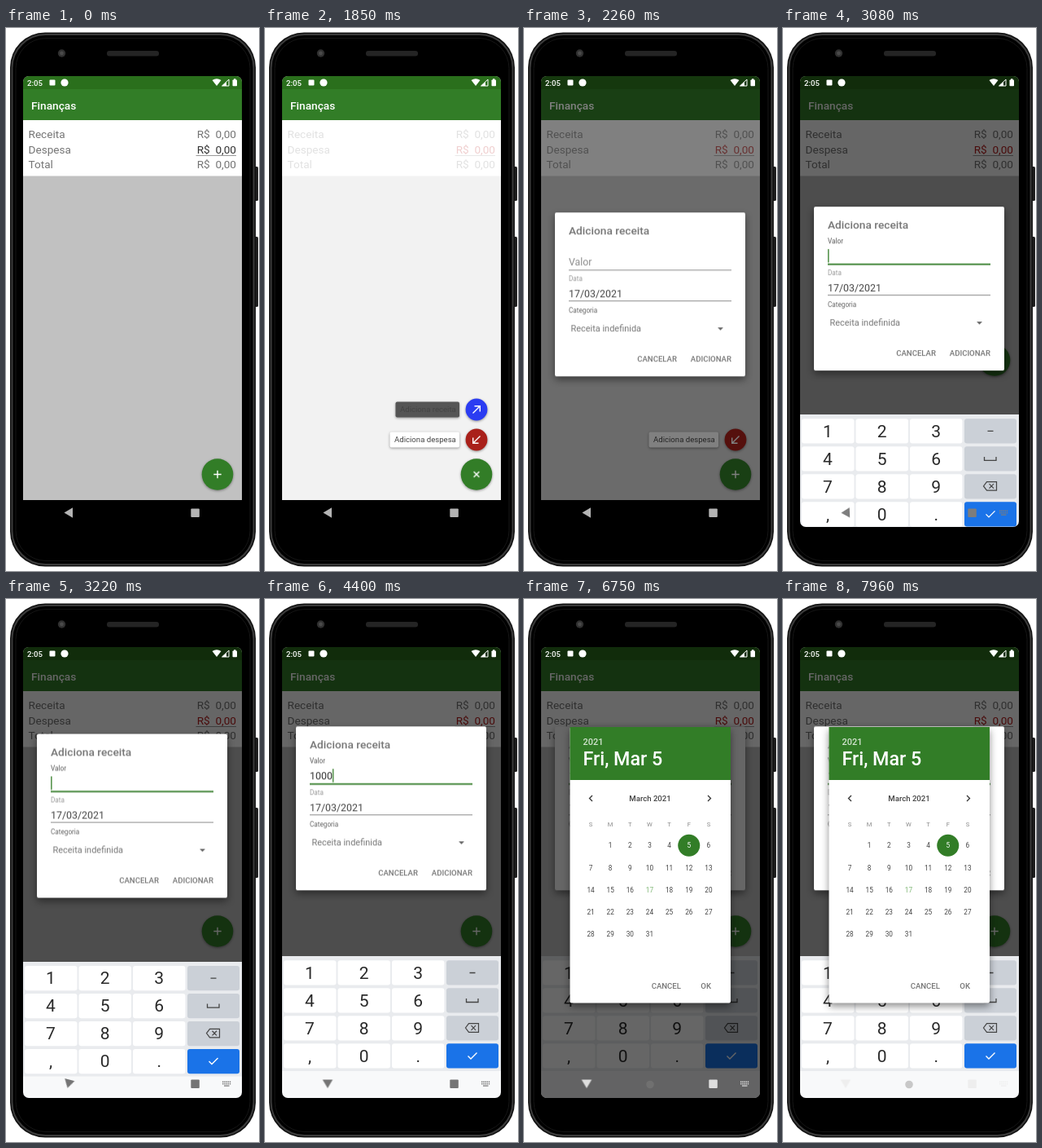
Animation of 311x666 px, one loop 7.99 s. Source, as an HTML page:

```html
<!DOCTYPE html>
<html lang="pt">
<head>
<meta charset="utf-8">
<title>Finanças</title>
<style>
html, body { margin: 0; width: 311px; height: 666px; overflow: hidden; background: #fff; }
svg { display: block; font-family: Roboto, "Noto Sans", sans-serif; }
text { white-space: pre; }
.m { font-weight: 500; }
.drop { filter: drop-shadow(0 1.5px 1.5px rgba(0,0,0,.4)); }
.float { filter: drop-shadow(0 4px 5px rgba(0,0,0,.45)); }
#plus { transform-origin: 260px 547.5px; }
#addIn { transform-origin: 260px 468px; }
#addOut { transform-origin: 260px 505px; }
#form { transform-origin: 155px 100px; }
#picker { transform-origin: 155px 326px; }
#back { transform-origin: 77px 594.5px; }
#hint { transform-origin: 55px 60px; }
</style>
</head>
<body>
<svg id="stage" width="311" height="666" viewBox="0 0 311 666"></svg>
<script>
const LOOP = 7990, GREEN = '#327d27', GREY = '#757575';
const SMOOTH = 'cubic-bezier(.4,0,.2,1)', HOLD = 'step-end';

// Text is placed by the middle of its capitals.
const txt = (x, mid, size, s, attrs = '') =>
  `<text x="${x}" y="${(mid + size * .355).toFixed(2)}" font-size="${size}" ${attrs}>${s}</text>`;
const box = (x, y, w, h, fill, attrs = '') =>
  `<rect x="${x}" y="${y}" width="${w}" height="${h}" fill="${fill}" ${attrs}/>`;
const disc = (x, y, r, fill, attrs = '') =>
  `<circle cx="${x}" cy="${y}" r="${r}" fill="${fill}" ${attrs}/>`;
const line = (d, color, w, attrs = '') =>
  `<path d="${d}" fill="none" stroke="${color}" stroke-width="${w}" ${attrs}/>`;
const MID = 'text-anchor="middle"', END = 'text-anchor="end"', BOLD = 'class="m"';

const phone = () =>
  box(305, 170, 5, 42, '#1d1d1d', 'rx="1.5"') + box(305, 256, 5, 86, '#1d1d1d', 'rx="1.5"') +
  box(5, 5.5, 302, 655, '#111', 'rx="43"') +
  box(7.5, 8, 297, 650, '#000', 'rx="41" stroke="#3b3b3b" stroke-width="2"') +
  box(12, 12.5, 288, 641, '#000', 'rx="37" stroke="#161616"') +
  box(124, 28, 64, 6.5, '#242424', 'rx="3"') +
  disc(68.5, 31, 4.7, '#303030') + disc(68.5, 31, 2.4, '#4a4a4a');

const row = (mid, name, id = '') =>
  txt(27.5, mid, 13.6, name, `fill="${GREY}"`) +
  txt(283, mid, 13.6, 'R$  0,00', `${END} id="${id}" fill="${GREY}"`);

const app = () =>
  box(21, 59, 269, 520, '#c1c1c1') +
  box(21, 59, 269, 16.5, '#2a6f1c') + box(21, 75, 269, 38, GREEN) +
  txt(31, 95, 13.7, 'Finanças', `${BOLD} fill="#fff"`) +
  box(21, 113, 269, 68.5, '#fff') +
  row(130.5, 'Receita', 'a') + row(149, 'Despesa', 'spent') + row(167.5, 'Total', 'b') +
  line('M233.5 156.5H283', '#9a9a9a', 1);

const status = () =>
  txt(26, 67.3, 9.6, '2:05', `${BOLD} fill="#fff"`) +
  box(53.5, 63.5, 7, 7, '#fff', 'rx="1"') + disc(72, 67, 4.6, '#fff') +
  '<path d="M253.5 64Q259 60.5 264.5 64L259 71Z" fill="#fff"/>' +
  '<path d="M274 63V71H265.5Z" fill="none" stroke="#fff"/><path d="M271 66V71H265.5Z" fill="#fff"/>' +
  box(278.5, 63.5, 5.5, 7.7, '#fff', 'rx=".8"') + box(280, 62.3, 2.5, 2, '#fff');

const action = (id, y, x, name, color, arrow) => `<g id="${id}">
  ${box(x, y - 9.5, 239 - x, 19, '#fff', `rx="2" class="drop" id="${id}Tag"`)}
  ${txt(x + 5.5, y, 9.6, name, 'fill="#444"')}
  ${disc(260, y, 13.4, color, 'class="drop"')}${line(arrow, '#fff', 1.4)}</g>`;

const menu = () =>
  action('addIn', 468, 160.5, 'Adiciona receita', '#2b3cf2', 'M255.5 472.5L264 464M257.5 463.7H264.3V470.5') +
  action('addOut', 505, 153.5, 'Adiciona despesa', '#a9201a', 'M264.5 500.5L256 509M255.7 502.5V509.3H262.5') +
  `<g id="fab">${disc(260, 547.5, 19.3, GREEN, 'class="drop"')}
   <g id="plus">${line('M255.3 547.5H264.7M260 542.8V552.2', '#fff', 1.4)}</g></g>`;

const form = () => `<g id="formMove"><g id="form">
  ${box(38, 0, 234, 201, '#fff', 'rx="2" class="float"')}
  ${txt(55, 22.3, 13.7, 'Adiciona receita', `${BOLD} fill="#757575"`)}
  <g id="hint">${txt(55, 60.3, 12.3, 'Valor', 'id="hintText" fill="#8c8c8c"')}</g>
  <text x="55" y="65" font-size="12.4" fill="#333">${[...'1000'].map((c, i) =>
    `<tspan id="key${i}">${c}</tspan>`).join('')}</text>
  ${box(55.2, 52, 1.3, 16.5, GREEN, 'id="caret"')}
  ${line('M55 70.7H255', '#8c8c8c', 1)}
  ${line('M55 70.6H255', GREEN, 1.6, 'id="focus"')}
  ${txt(55, 81, 8.2, 'Data', 'fill="#9a9a9a"')}
  ${txt(55, 99.3, 12.4, '17/03/2021', 'fill="#444"')}
  ${line('M55 108.5H255', '#8c8c8c', 1)}
  ${line('M55 108.4H255', GREEN, 1.6, 'id="press"')}
  ${txt(55, 120.3, 8.2, 'Categoria', 'fill="#666"')}
  ${txt(57.5, 142.3, 10.95, 'Receita indefinida', 'fill="#777"')}
  <path d="M238 141H245L241.5 144.5Z" fill="#666"/>
  ${txt(188, 180, 9.6, 'CANCELAR', `${BOLD} ${END} fill="#757575"`)}
  ${txt(255, 180, 9.6, 'ADICIONAR', `${BOLD} ${END} fill="#757575"`)}
</g></g>`;

const keyboard = () => {
  let out = box(21, 438, 269, 176, '#e9ebee') + box(21, 579, 269, 35, '#f8f9fa');
  ['123', '456', '789', ',0.'].forEach((keys, r) => {
    const mid = 458.3 + 34 * r;
    [...keys].forEach((k, c) => {
      out += box(23 + 66.5 * c, mid - 15, 64.5, 30.3, '#fff', 'rx="3"') +
        txt(55 + 66.6 * c, mid, 21, k, `${MID} fill="#2a2a2a"`);
    });
    out += box(223, mid - 15, 64, 30.3, r < 3 ? '#cbd0d7' : '#1a73e8', 'rx="3"');
  });
  return `<g id="keyboard">${out}
    ${line('M251.5 458.5H258.5M247.5 490V494.5H262V490', '#444', 1.3)}
    ${line('M250.5 520.7H262.5V531.3H250.5L246.5 526ZM253.5 523.2L259 528.8M259 523.2L253.5 528.8', '#444', 1.2)}
    ${line('M249.5 560.5L253 564L260.5 556.5', '#fff', 1.4)}</g>`;
};

const nav = () => `<g id="nav">
  <path id="back" d="M71.5 594.5L82 588.3V600.7Z"/>
  <rect x="227.3" y="589.5" width="10.5" height="10.5" rx="1"/>
  <g id="switcher">${[0, 1].map(r => [0, 1, 2, 3, 4].map(c =>
    `<rect x="${266 + 2.2 * c}" y="${591.5 + 2.4 * r}" width="1.4" height="1.5"/>`).join('')).join('')}
  <rect x="268" y="596.5" width="6.5" height="1.2"/></g></g>` + disc(155, 595.5, 4.8, '#777', 'id="home"');

const picker = () => {
  const col = c => 82 + 24.15 * c;
  let days = '';
  [...'SMTWTFS'].forEach((d, c) => days += txt(col(c), 276, 7.6, d, `${MID} fill="#8a8a8a"`));
  for (let d = 1; d < 32; d++)
    days += txt(col(d % 7), 302.3 + 27.3 * Math.floor(d / 7), 8.2, d, `${MID} id="day${d}" fill="#444"`);
  return `<g id="picker">
    ${box(56.5, 157, 197.5, 338.5, '#fff', 'rx="2" class="float"')}
    ${box(56.5, 157, 197.5, 65, GREEN)}
    ${txt(72.5, 175, 10.95, '2021', `${BOLD} fill="#d3e4d0"`)}
    ${txt(72.5, 195.3, 23.3, 'Wed, Mar 17', `${BOLD} id="before" fill="#fff"`)}
    ${txt(72.5, 195.3, 23.3, 'Fri, Mar 5', `${BOLD} id="after" fill="#fff"`)}
    ${txt(155, 244.5, 9.6, 'March 2021', `${BOLD} ${MID} fill="#444"`)}
    ${line('M84 241L80.5 244.5L84 248M226 241L229.5 244.5L226 248', '#333', 1.3)}
    ${disc(col(5), 302.3, 13.5, GREEN, 'id="pick"')}${days}
    ${txt(193, 475, 9.6, 'CANCEL', `${BOLD} ${END} fill="#757575"`)}
    ${txt(230, 475, 9.6, 'OK', `${BOLD} ${END} fill="#757575"`)}</g>`;
};

document.getElementById('stage').innerHTML = `
  <clipPath id="glass"><rect x="21" y="59" width="269" height="553" rx="7"/></clipPath>
  ${phone()}
  <g clip-path="url(#glass)">
    ${app()}
    ${box(21, 113, 269, 466, '#fff', 'id="veil"')}
    ${menu()}
    ${box(21, 59, 269, 520, '#000', 'id="dim"')}
    ${form()}${keyboard()}
    ${box(21, 59, 269, 553, '#000', 'id="dimAll"')}
    ${status()}${nav()}${picker()}
  </g>`;

// Steps are [ms, value, easing towards the next step].
const start = document.timeline.currentTime || 0;
function play(id, prop, steps, ease = 'linear') {
  const all = [[0, steps[0][1], HOLD], ...steps, [LOOP, steps[steps.length - 1][1]]];
  const frames = all.map(([ms, value, own]) => ({ offset: ms / LOOP, [prop]: value, easing: own || ease }));
  document.getElementById(id).animate(frames, { duration: LOOP, iterations: Infinity }).startTime = start;
}
const show = (id, on, off = LOOP) =>
  play(id, 'visibility', [[0, 'hidden'], [on, 'visible'], [off, off < LOOP ? 'hidden' : 'visible']], HOLD);

// Floating menu
play('veil', 'opacity', [[830, 0], [1150, .79], [2120, .79], [2350, 0]]);
play('spent', 'fill', [[830, '#333'], [1150, '#b71c1c']]);
play('plus', 'transform', [[830, 'rotate(0deg)'], [1130, 'rotate(45deg)'], [2120, 'rotate(45deg)'], [2240, 'rotate(0deg)']], SMOOTH);
const pop = (id, on, off) => {
  play(id, 'transform', [[on, 'scale(0)'], [on + 130, 'scale(1.08)'], [on + 200, 'scale(1)'], [off, 'scale(1)'], [off + 90, 'scale(0)']]);
  play(id, 'opacity', [[on, 0], [on + 120, 1], [off, 1], [off + 90, 0]]);
};
pop('addOut', 860, 2275);
pop('addIn', 980, 2130);
play('addInTag', 'fill', [[1845, '#fff', HOLD], [1850, '#555'], [1940, '#484848']]);
play('fab', 'transform', [[0, 'translate(0,0)'], [2950, 'translate(0,-140px)']], HOLD);

// Form
play('dim', 'opacity', [[2120, 0], [2290, .6], [5585, .6, HOLD], [5590, 0, HOLD], [7960, .6, HOLD]]);
play('form', 'opacity', [[2120, 0], [2240, 1]]);
play('form', 'transform', [[2120, 'scale(.92)'], [2250, 'scale(1)']], 'ease-out');
play('formMove', 'transform', [[3020, 'translate(0,226.3px)'], [3360, 'translate(0,156.3px)']], SMOOTH);
play('hint', 'transform', [[2770, 'translate(0,0) scale(1)'], [2930, 'translate(0,-17.5px) scale(.667)']], SMOOTH);
play('hintText', 'fill', [[2770, '#8c8c8c'], [2930, '#555']]);
show('focus', 2770);
show('press', 5290, 5390);
const typed = [3670, 3850, 4150, 4400];
typed.forEach((ms, i) => show('key' + i, ms));
play('caret', 'transform', [[0, 'translate(0,0)'], ...typed.map((ms, i) => [ms, `translate(${6.96 * (i + 1)}px,0)`])], HOLD);
play('caret', 'opacity', [[0, 0], [2770, 1], [4910, 0], [5390, 1]], HOLD);

// Keyboard and navigation
play('keyboard', 'transform', [[2780, 'translate(0,178px)'], [3360, 'translate(0,0)']], SMOOTH);
play('back', 'transform', [[3050, 'rotate(0deg)'], [3360, 'rotate(-90deg)']], SMOOTH);
play('nav', 'fill', [[2950, '#b4b4b4'], [3100, '#757575'], [5585, '#757575', HOLD], [5590, '#636363'], [5750, '#dedede', HOLD], [7960, '#eee', HOLD]]);
show('switcher', 3000);
show('home', 5600);
play('home', 'fill', [[0, '#707070'], [7960, '#c8c8c8']], HOLD);

// Date picker
play('dimAll', 'opacity', [[0, 0], [5590, .6], [7960, 0]], HOLD);
play('picker', 'opacity', [[5590, 0], [5730, 1]]);
play('picker', 'transform', [[5590, 'scale(.92)'], [5750, 'scale(1)']], 'ease-out');
show('before', 0, 6670);
show('after', 6670);
play('pick', 'transform', [[0, 'translate(-48.3px,54.6px)'], [6670, 'translate(0,0)']], HOLD);
play('pick', 'opacity', [[0, 1], [6670, .6], [6750, 1]], HOLD);
play('day17', 'fill', [[0, '#fff'], [6670, '#7db573']], HOLD);
play('day5', 'fill', [[0, '#444'], [6670, '#fff']], HOLD);
</script>
</body>
</html>
```
